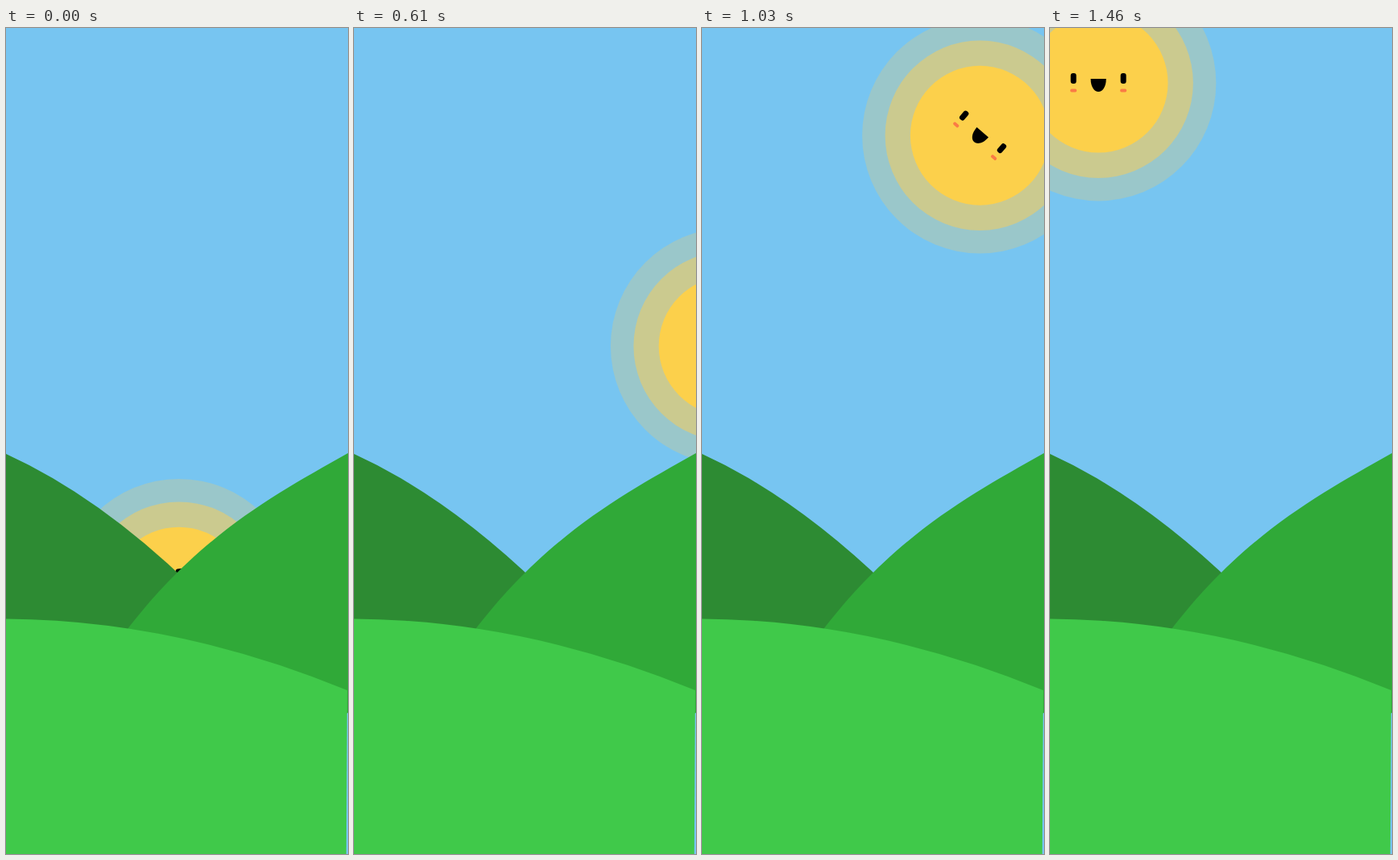
Animation of 425 by 1024 pixels, one loop 2320 ms. Source, as an HTML page:

```html
<!DOCTYPE html>
<html lang="en">
<head>
<meta charset="utf-8">
<title>Sunrise</title>
<style>
  html, body { margin: 0; width: 100%; height: 100%; overflow: hidden; background: #77c5f1; }
  svg { display: block; width: 100%; height: 100%; }
</style>
</head>
<body>
<svg viewBox="0 0 425 1024">
  <rect width="425" height="1024" fill="#77c5f1"/>
  <g id="sun">
    <circle r="146.2" fill="#9ac7ca"/>
    <circle r="117.7" fill="#cbca8f"/>
    <circle r="86.4" fill="#fcd04b"/>
    <g id="face">
      <rect x="-34.5" y="-12.3" width="7" height="13" rx="3"/>
      <rect x="27.5" y="-12.3" width="7" height="13" rx="3"/>
      <path d="M-9.6 -5.3H9.6C9.6 5 5 10.7 0 10.7S-9.6 5 -9.6 -5.3Z"/>
      <g fill="#fa7b45">
        <rect x="-35" y="7.3" width="8" height="4" rx="1.7"/>
        <rect x="27" y="7.3" width="8" height="4" rx="1.7"/>
      </g>
    </g>
  </g>
  <path fill="#2d8b33" d="M0 528Q115 580.2 230 691.1V800H0Z"/>
  <path fill="#30a938" d="M425 527C330 580.5 235 631.1 140 759.9L300 900L425 849Z"/>
  <path fill="#40c94a" d="M0 732.5Q212 733.9 424 821L422.8 1024H0Z"/>
</svg>
<script>
  const LOOP = 2320;
  const PIVOT = { x: 137.5, y: 386.65, r: 327.7 };
  const START = 76.35;             // orbit angle at sunrise, degrees
  const LAST = 46;                 // final step, after which the sun rests
  const SLOW = [4, 8, 13, 18, 21, 23, 26, 34];  // steps held 40 ms, others 30 ms
  const sun = document.getElementById('sun');
  const face = document.getElementById('face');
  const t0 = performance.now();

  function stepAt(ms) {
    let n = 0, end = 0;
    while (n < LAST) {
      end += SLOW.includes(n) ? 40 : 30;
      if (ms < end) break;
      n++;
    }
    return n;
  }

  function draw(n) {
    const swept = Math.max(0, Math.min(180, 4 * n - 1));
    const a = (START - swept) * Math.PI / 180;
    const x = PIVOT.x + PIVOT.r * Math.cos(a);
    const y = PIVOT.y + PIVOT.r * Math.sin(a);
    const tilt = 180 - swept - 2.62 * Math.max(0, 36.6 - n);
    sun.setAttribute('transform', `translate(${x} ${y})`);
    face.setAttribute('transform', `rotate(${tilt})`);
  }

  function tick() {
    draw(stepAt((performance.now() - t0) % LOOP));
    requestAnimationFrame(tick);
  }
  tick();
</script>
</body>
</html>
```
